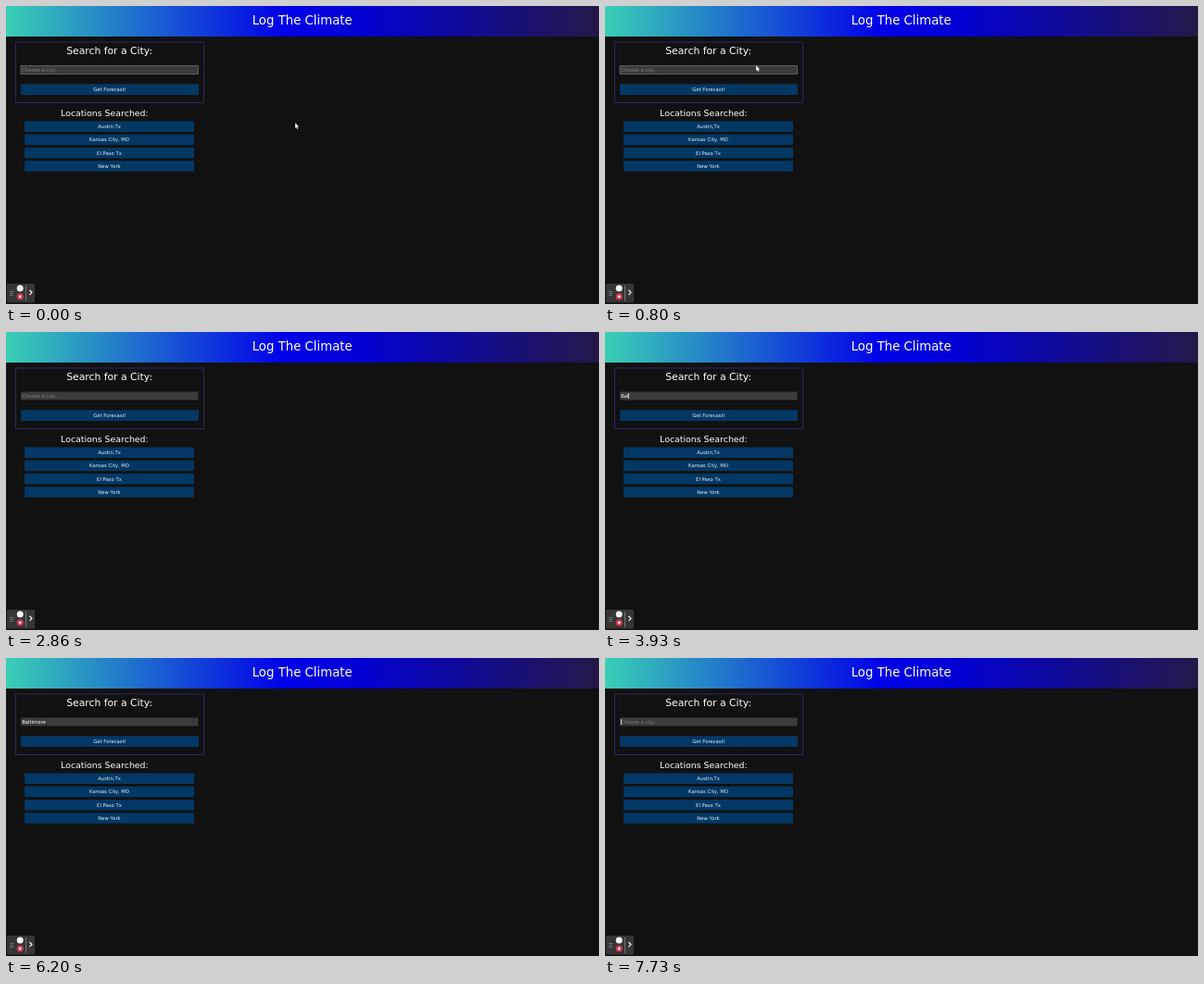
Animation, 640 px wide and 322 px high, one loop 8000 ms. Source, as an HTML page with a canvas:

```html
<!DOCTYPE html>
<html lang="en">
<head>
<meta charset="utf-8">
<title>Weather search</title>
<style>
html, body { margin: 0; width: 100%; height: 100%; overflow: hidden; background: #111; }
canvas { display: block; width: 640px; height: 322px; }
</style>
</head>
<body>
<canvas id="stage"></canvas>
<script>
const LOOP = 8000;
const canvas = document.getElementById('stage');
const scale = window.devicePixelRatio || 1;
canvas.width = 640 * scale;
canvas.height = 322 * scale;
const ctx = canvas.getContext('2d');
ctx.scale(scale, scale);

const CITY = 'Baltimore';
const KEY_TIMES = [3600, 3730, 3930, 4130, 4400, 4600, 4860, 5060, 5330];
const CLEAR_TIME = 6660;
const FOCUS_TIME = 1200;
const CARET_SPANS = [[1200, 1730], [2330, 2860], [3400, 5330], [5660, 6200], [6460, 7200], [7730, LOOP]];
const PLACES = ['Austin,Tx', 'Kansas City, MO', 'El Paso Tx', 'New York'];

function label(text, x, y, size, color = '#fff', align = 'center') {
  ctx.font = `${size}px "DejaVu Sans", sans-serif`;
  ctx.textAlign = align;
  ctx.textBaseline = 'alphabetic';
  ctx.fillStyle = color;
  ctx.fillText(text, x, y);
}

function box(x, y, w, h, color, radius = 0) {
  ctx.fillStyle = color;
  ctx.beginPath();
  ctx.roundRect(x, y, w, h, radius);
  ctx.fill();
}

function frame(x, y, w, h, color, radius = 0) {
  ctx.strokeStyle = color;
  ctx.lineWidth = 1;
  ctx.beginPath();
  ctx.roundRect(x, y, w, h, radius);
  ctx.stroke();
}

function disc(x, y, r, color) {
  ctx.fillStyle = color;
  ctx.beginPath();
  ctx.arc(x, y, r, 0, Math.PI * 2);
  ctx.fill();
}

function button(text, x, y, w, h) {
  box(x, y, w, h, '#033865', 1);
  label(text, x + w / 2, y + h / 2 + 1.9, 5.3, '#e4f1fa');
}

function drawHeader() {
  const fill = ctx.createLinearGradient(0, 0, 640, 0);
  fill.addColorStop(0, '#3acfb6');
  fill.addColorStop(0.47, '#0000e8');
  fill.addColorStop(0.6, '#0200d2');
  fill.addColorStop(1, '#241848');
  box(0, 0, 640, 33, fill);
  label('Log The Climate', 319.7, 20, 13.3);
}

function drawInput(t) {
  const focused = t >= FOCUS_TIME;
  const typed = t < CLEAR_TIME ? KEY_TIMES.filter(k => t >= k).length : 0;
  const text = CITY.slice(0, typed);
  box(16, 64.5, 191.5, 9, '#3b3b3b');
  if (!focused) frame(16, 64.5, 191.5, 9, '#5c5c5c');
  label(text || 'Choose a city...', 17.2, 70.9, 5.3, text ? '#fff' : '#818181', 'left');
  if (CARET_SPANS.some(([on, off]) => t >= on && t < off)) {
    box(17 + ctx.measureText(text).width, 66, 0.7, 6, '#fff');
  }
}

function drawToolbar() {
  box(1, 300, 30, 20.5, '#363636', 1);
  box(21, 302, 0.8, 17, '#858585');
  for (let row = 0; row < 3; row++) {
    box(4.5, 308 + row * 2, 1, 1, '#aaa');
    box(6.5, 308 + row * 2, 1, 1, '#aaa');
  }
  disc(15.2, 305, 3.5, '#f4f4f4');
  disc(15.2, 314, 3.5, '#d93a50');
  box(14, 312.8, 2.4, 2.4, '#fff');
  ctx.strokeStyle = '#fff';
  ctx.lineWidth = 1.1;
  ctx.beginPath();
  ctx.moveTo(25.5, 307);
  ctx.lineTo(28, 309.6);
  ctx.lineTo(25.5, 312.2);
  ctx.stroke();
}

function drawPointer(t) {
  if (t >= 930) return;
  const p = Math.min(1, Math.max(0, t / 800));
  const eased = p * p * (3 - 2 * p);
  ctx.save();
  ctx.translate(312.2 - 149 * eased, 126.2 - 62 * eased);
  ctx.beginPath();
  [[0, 0], [0, 5.8], [1.2, 4.7], [2.1, 6.8], [3, 6.4], [2.1, 4.3], [3.9, 4.2]]
    .forEach(([x, y]) => ctx.lineTo(x, y));
  ctx.closePath();
  ctx.fillStyle = '#fff';
  ctx.fill();
  ctx.restore();
}

function draw(t) {
  box(0, 0, 640, 322, '#111');
  drawHeader();
  frame(10.5, 39, 203, 65.5, '#30265f');
  label('Search for a City:', 111.6, 52, 10.8);
  drawInput(t);
  button('Get Forecast!', 16, 84.3, 192, 11.7);
  label('Locations Searched:', 106.4, 119.2, 9.38);
  PLACES.forEach((place, i) => button(place, 20, 124.4 + i * 14.25, 183, 11.7));
  drawToolbar();
  drawPointer(t);
}

function tick() {
  draw(performance.now() % LOOP);
  requestAnimationFrame(tick);
}
tick();
</script>
</body>
</html>
```
